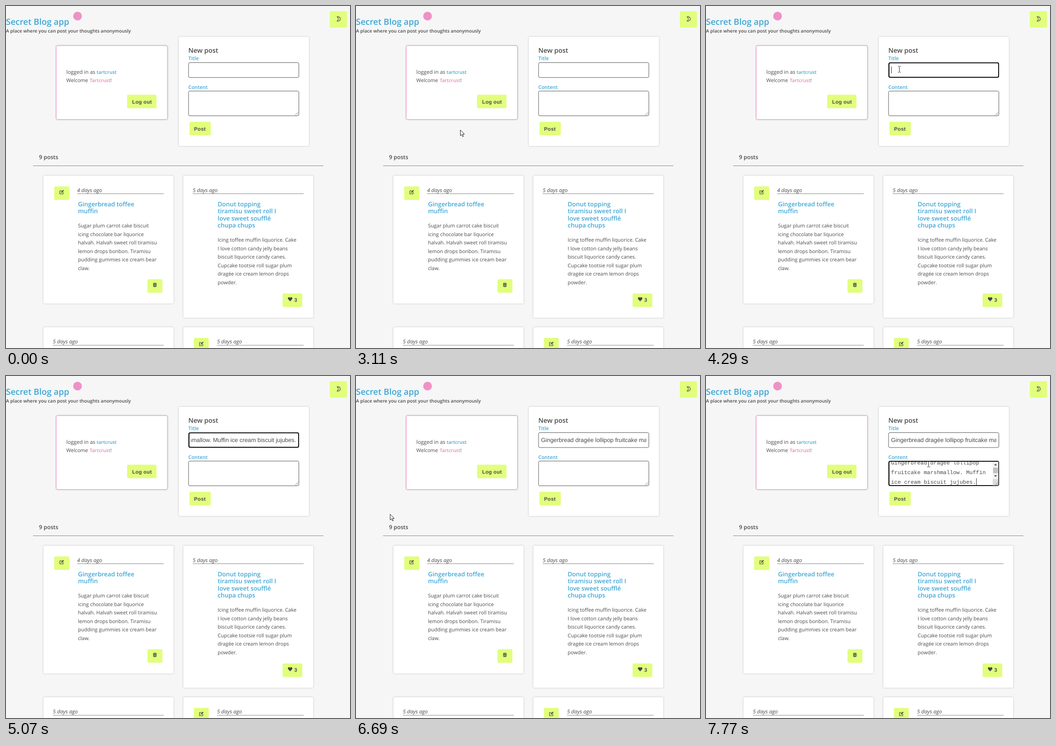
Recreate the animation shown at these times as an HTML page. Size 750 by 746 pixels, loop 8000 ms.

```html
<!DOCTYPE html>
<html lang="en">
<head>
<meta charset="utf-8">
<title>Secret Blog app</title>
<style>
  html, body { margin: 0; width: 100%; height: 100%; overflow: hidden; background: #f6f6f6; }
  svg { display: block; width: 100%; height: 100%; }
  text { font-family: "Open Sans", "Noto Sans", sans-serif; fill: #4a4a4a; text-rendering: geometricPrecision; white-space: pre; }
  .semi { font-weight: 600; }
  .blue { fill: #3fa7d6; }
  .pink { fill: #ea82bb; }
  .body { font-size: 11px; }
  .label { font-size: 10.9px; }
  .title { font-size: 13.4px; }
  .date { font-size: 11.5px; font-style: italic; }
  .button { font: bold 11.2px "Liberation Sans", Arial, sans-serif; letter-spacing: .3px; }
  .input { font: 12.8px "Liberation Sans", Arial, sans-serif; }
  .area { font: 11.87px "Liberation Mono", monospace; }
  .card { fill: #fff; filter: drop-shadow(0 0 1.5px rgba(0, 0, 0, .25)); }
  .lime { fill: #e1fe7c; }
  .rule { stroke: #858585; }
  .icon { fill: none; stroke: #444; stroke-width: 1.2; }
  .caret { stroke: #333; }
</style>
</head>
<body>
<svg id="stage" viewBox="0 0 750 746">
  <defs>
    <clipPath id="titleClip"><rect x="403" y="126" width="230" height="28"/></clipPath>
    <clipPath id="areaClip"><rect x="400" y="187" width="225" height="51"/></clipPath>
    <g id="pencil" class="icon">
      <path d="M1 -3H-4V4H3V0"/>
      <path d="M-1.5 1.5L-1 -.5L3.2 -4.7L4.7 -3.2L.5 1Z" fill="#444" stroke="none"/>
    </g>
  </defs>
  <g id="page"></g>
  <g id="form"></g>
  <ellipse id="press" rx="9.5" ry="10" fill="#ff0" fill-opacity=".47"/>
  <g id="pointer">
    <path id="arrow" d="M.5 .5V13L3.4 10.3L5.4 15L7.4 14.2L5.4 9.6H9.5Z" fill="#fff" stroke="#222" stroke-linejoin="round"/>
    <path id="beam" d="M-2.5 -6.5H-.5L.5 -5.5L1.5 -6.5H3.5M.5 -5.5V5.5M-2.5 6.5H-.5L.5 5.5L1.5 6.5H3.5" fill="none" stroke="#222"/>
  </g>
</svg>
<script>
const LOOP = 8000;
const TITLE = "Gingerbread dragée lollipop fruitcake marshmallow. Muffin ice cream biscuit jujubes.";
const el = id => document.getElementById(id);

const label = (x, y, cls, str, size) =>
  `<text x="${x}" y="${y}" class="${cls}"${size ? ` style="font-size:${size}px"` : ""}>${str}</text>`;
const box = (x, y, w, h, cls, extra = "") =>
  `<rect x="${x}" y="${y}" width="${w}" height="${h}" rx="3" class="${cls}" ${extra}/>`;
const rule = (x1, x2, y) => `<path class="rule" d="M${x1} ${y}H${x2}"/>`;
const lines = (x, y, step, cls, list) =>
  list.map((str, i) => label(x, +(y + i * step).toFixed(1), cls, str)).join("");

const header = [
  label(0, 41, "semi blue", "Secret Blog app", 18.5),
  `<circle cx="156" cy="22" r="9.5" fill="#ee92c6"/>`,
  label(0, 57.5, "semi", "A place where you can post your thoughts anonymously", 10.1),
  box(706, 11.5, 37.5, 35.5, "lime"),
  `<path class="icon" d="M722 23.5C731 22 731 34.5 722 32.8C725.4 30.5 725.4 26 722 23.5Z"/>`
];

const account = [
  box(109.5, 86.5, 242.5, 161, "card", 'stroke="#ee92c6"'),
  label(131.5, 147.5, "body", "logged in as", 11.4),
  label(197.5, 147.5, "semi blue", "tartcrust", 10.3),
  label(131.5, 166, "body", "Welcome"),
  label(182.5, 166, "body", '<tspan class="semi pink">Tartcrust</tspan>!', 10.4),
  box(264, 193.5, 64, 29.5, "lime"),
  label(275, 212.5, "button", "Log out")
];

const newPost = [
  box(376.5, 67, 284, 238.5, "card"),
  label(397.5, 102, "semi", "New post", 14.4),
  label(397.5, 118, "semi blue label", "Title"),
  label(397.5, 181, "semi blue label", "Content"),
  box(400, 252.5, 46.5, 29.5, "lime"),
  label(410, 271.5, "button", "Post")
];

const posts = [
  label(72, 333.5, "semi", "9 posts", 12.2),
  rule(59, 692, 348.5),

  box(81.5, 370, 284, 279, "card"),
  box(105, 393.5, 33, 29.5, "lime"),
  `<use href="#pencil" x="121.5" y="406"/>`,
  label(155, 405.5, "date", "4 days ago"),
  rule(155, 344, 409.5),
  lines(157, 437, 15.4, "semi blue title", ["Gingerbread toffee", "muffin"]),
  lines(157, 483, 18.6, "body", [
    "Sugar plum carrot cake biscuit", "icing chocolate bar liquorice",
    "halvah. Halvah sweet roll tiramisu", "lemon drops bonbon. Tiramisu",
    "pudding gummies ice cream bear", "claw."]),
  box(308.5, 596, 32.5, 29.5, "lime"),
  `<path class="icon" d="M321.5 606V611.5Q324.5 613.5 327.5 611.5V606M323.5 607V612M325.5 607V612"/>`,
  `<ellipse class="icon" cx="324.5" cy="605.5" rx="3" ry="1.2"/>`,

  box(386.5, 370, 283.5, 310, "card"),
  label(407, 405.5, "date", "5 days ago"),
  rule(407, 649, 409.5),
  lines(461.5, 437, 15.4, "semi blue title",
    ["Donut topping", "tiramisu sweet roll I", "love sweet soufflé", "chupa chups"]),
  lines(461.5, 514, 18.6, "body", [
    "Icing toffee muffin liquorice. Cake", "I love cotton candy jelly beans",
    "biscuit liquorice candy canes.", "Cupcake tootsie roll sugar plum",
    "dragée ice cream lemon drops", "powder."]),
  box(603, 627, 43, 29.5, "lime"),
  `<path fill="#444" d="M619.5 644.2L615.2 639.6C613 636.5 617.5 633.5 619.5 636.8C621.5 633.5 626 636.5 623.8 639.6Z"/>`,
  label(628.5, 644.5, "button", "3"),

  box(81.5, 700.5, 284, 60, "card"),
  label(102, 736, "date", "5 days ago"),
  rule(102, 344, 740),
  box(386.5, 700.5, 283.5, 60, "card"),
  box(409.5, 724, 32.5, 30, "lime"),
  `<use href="#pencil" x="426" y="737"/>`,
  label(460, 736, "date", "5 days ago"),
  rule(460, 649, 740)
];

el("page").innerHTML = [header, account, newPost, posts].flat().join("");

const field = (id, y, h) =>
  box(398, y, 240.5, h, "", `id="${id}" fill="#fff" stroke="#555"`) +
  box(399, y + .5, 239, h - 1, "", `id="${id}Focus" fill="none" stroke="#101010" stroke-width="2"`);

el("form").innerHTML =
  field("titleBox", 123.5, 32.5) +
  `<g clip-path="url(#titleClip)">
    <text id="titleHead" class="input" x="403.5" y="143.5">${TITLE}</text>
    <text id="titleTail" class="input" x="632.3" y="143.5" text-anchor="end">${TITLE}</text>
  </g>
  <path id="titleCaret" class="caret"/>` +
  field("areaBox", 185.5, 54) +
  `<g id="areaText">
    <g clip-path="url(#areaClip)">` +
    lines(403.5, 193, 21, "area",
      ["Gingerbread dragée lollipop", "fruitcake marshmallow. Muffin", "ice cream biscuit jujubes."]) +
    `</g>
    <path fill="#f1f1f1" d="M625 187H637.5V225H625Z"/>
    <path fill="#c1c1c1" d="M626 200H636.5V212H626Z"/>
    <path fill="#dcdcdc" d="M625 225H637.5V238.5H625Z"/>
    <path fill="#505050" d="M628 195L631.2 191.5L634.5 195ZM628 216.5H634.5L631.2 220Z"/>
  </g>
  <path d="M630.5 238L637 231.5M634.5 238L637 235.5" stroke="#777"/>
  <path id="areaCaret" class="caret"/>`;

// Each move holds its last point until `end`; a null point hides the pointer.
const moves = [
  { start: 390, gap: 80, end: 700, path: [[708, 738], [684, 735]] },
  { start: 700, gap: 90, end: 790, path: [[706, 738]] },
  { start: 3110, gap: 78, end: 4840, path: [[227, 270], [239, 262], [260, 247], [288, 227], [319, 204],
    [350, 182], [379, 164], [406, 150], [425, 142], [432, 139], [421, 138]] },
  { start: 4840, gap: 77, end: 5070, path: [[330, 172], [188, 236], [66, 287]] },
  { start: 6690, gap: 78.5, end: 8000, path: [[74, 301], [128, 268], [218, 221], [318, 180],
    [400, 158], [450, 164], [478, 183], [485, 192]] }
];

function pointerAt(t) {
  const move = moves.find(m => t >= m.start && t < m.end);
  if (!move) return null;
  const step = Math.floor((t - move.start) / move.gap + 1e-6);
  return move.path[Math.min(step, move.path.length - 1)];
}

const within = (v, a, b) => v >= a && v < b;
const overField = (x, y) => within(x, 398, 639) && (within(y, 123, 157) || within(y, 185, 240));
const show = (id, on) => el(id).setAttribute("visibility", on ? "inherit" : "hidden");

function setCaret(id, on, x, top, bottom) {
  show(id, on);
  el(id).setAttribute("d", `M${x} ${top}V${bottom}`);
}

function draw(t) {
  const typed = t >= 4520, pasted = t >= 7770;
  const titleFocus = within(t, 4120, 5600);
  show("titleBoxFocus", titleFocus);
  show("titleTail", typed && titleFocus);
  show("titleHead", typed && !titleFocus);
  setCaret("titleCaret", within(t, 4120, 5000), typed ? 632.5 : 404.5, 132, 147);

  show("areaBoxFocus", t >= 7470);
  show("areaText", pasted);
  if (pasted) setCaret("areaCaret", true, 589.5, 223, 238);
  else setCaret("areaCaret", t >= 7470, 404.5, 192, 207);

  const p = pointerAt(t);
  show("pointer", !!p);
  if (p) {
    const text = overField(...p);
    el("pointer").setAttribute("transform", `translate(${p[0]} ${p[1]})`);
    show("beam", text);
    show("arrow", !text);
  }

  const pressed = within(t, 4120, 4290) || within(t, 7470, 7620);
  show("press", pressed);
  if (pressed) {
    el("press").setAttribute("cx", p[0] - 1.5);
    el("press").setAttribute("cy", p[1] - 1);
  }
}

const begin = performance.now();
function tick(now) {
  draw(Math.max(0, now - begin) % LOOP);
  requestAnimationFrame(tick);
}
draw(0);
requestAnimationFrame(tick);
</script>
</body>
</html>
```
